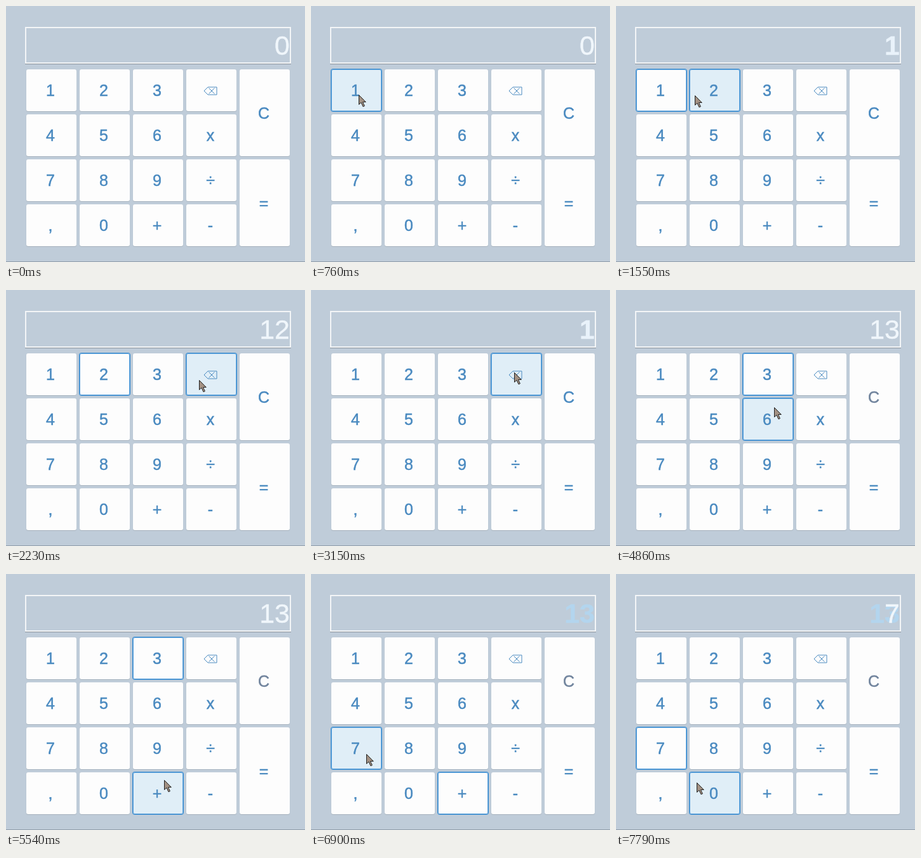
Animation, 471 px wide and 404 px high, one loop 8 s. Source, as an HTML page:

```html
<!DOCTYPE html>
<html lang="en">
<head>
<meta charset="utf-8">
<title>Calculator</title>
<style>
  html, body { margin: 0; width: 100%; height: 100%; overflow: hidden; }
  body { position: relative; background: #bfccd9; font-family: "Liberation Sans", Arial, sans-serif; }
  body::after { content: ""; position: absolute; left: 0; right: 0; top: 403px; height: 1px; background: #8f9ca9; }
  #display {
    position: absolute; left: 30px; top: 33px; width: 415px; height: 54px;
    border: 2px solid #f3f5f7; box-shadow: 0 1px 0 #8b949d;
  }
  #display span {
    position: absolute; right: 0; top: 0; font-size: 43px; line-height: 54px;
    color: #f0f6fb; -webkit-text-stroke: .4px;
  }
  #display .bold { font-weight: bold; color: #e9f2fa; }
  #display #operand { font-weight: bold; color: #b3d5ee; }
  .key {
    position: absolute; width: 79px; box-sizing: border-box; padding: 1px 3px 0 0;
    display: flex; align-items: center; justify-content: center;
    background: #fdfdfd; color: #4a8ac0; font-size: 25px; -webkit-text-stroke: .5px;
    border-radius: 3px; box-shadow: 0 1px 1px #a9b4bf;
  }
  .key.focus, .key.hover { box-shadow: 0 0 0 1px #3288cf, inset 0 0 0 1px #6aa8dc; }
  .key.hover { background: #e0eef7; }
  #cursor { position: absolute; left: 0; top: 0; overflow: visible; }
</style>
</head>
<body>
<div id="display"><span id="operand"></span><span id="value"></span></div>
<svg id="cursor" width="13" height="20">
  <path d="M.5 .5V15.5l3.5-3.2 3 6.5 2.4-1.1-2.9-6.2h4.8z" fill="#a39183" stroke="#222"/>
</svg>
<script>
const LOOP = 8000, START = 302, STEP = 113.4, CLICK = 1.5;
const $ = id => document.getElementById(id);
const cursor = $("cursor"), value = $("value"), operand = $("operand");

const eraseIcon = `<svg width="22" height="14" fill="none" stroke="currentColor">
  <path d="M1 7l6-6H21v12H7zM8.5 2.5l9 9m0-9l-9 9"/></svg>`;

// label, column, row, row span
const layout = [
  ["C", 4, 0, 2], ["=", 4, 2, 2],
  ...[..."123⌫456x789÷,0+-"].map((label, i) => [label, i % 4, i >> 2, 1])
];
const keys = layout.map(([label, column, row, span]) => {
  const box = { x: Math.round(32 + column * 83.9), y: 100 + row * 71, w: 79, h: span * 71 - 5 };
  const el = document.createElement("div");
  el.className = "key";
  el.style.cssText = `left:${box.x}px;top:${box.y}px;height:${box.h}px`;
  if (label === "⌫") el.innerHTML = eraseIcon;
  else el.textContent = label;
  document.body.insertBefore(el, cursor);
  return { label, el, ...box };
});
const clearKey = keys[0];

// Pointer stops: arrival step, departure step, x, y
const stops = [
  [0, 0, 80, 352], [4, 8, 75, 140], [11, 11, 124, 141], [15, 15, 142, 142],
  [18, 18, 361, 142], [21, 26, 320, 130], [28, 28, 430, 200], [30, 30, 460, 283],
  [33, 37, 249, 136], [46, 51, 249, 325], [58, 62, 87, 284], [66, 99, 127, 329]
];
const presses = [[5.5, "1"], [13.5, "2"], [21, "⌫"], [35, "3"], [49, "+"], [59.5, "7"]];

function pointerAt(step) {
  const i = stops.findLastIndex(stop => stop[0] <= step);
  const [, leave, x, y] = stops[i];
  if (step <= leave) return [x, y];
  const [arrive, , nextX, nextY] = stops[i + 1];
  const f = (step - leave) / (arrive - leave), eased = f * f * (3 - 2 * f);
  return [x + (nextX - x) * eased, y + (nextY - y) * eased];
}

// A key takes focus when pressed and acts when released
function calculate(step) {
  const state = { focus: "", text: "0", stored: "" };
  for (const [pressed, label] of presses) {
    if (step >= pressed) state.focus = label;
    if (step < pressed + CLICK) continue;
    if (label === "⌫") state.text = state.text.slice(0, -1);
    else if (label === "+") [state.stored, state.text] = [state.text, ""];
    else state.text = state.text === "0" ? label : state.text + label;
  }
  return state;
}

function render(time) {
  const step = Math.floor((time - START) / STEP);
  const [x, y] = step < 0 ? [-99, -99] : pointerAt(step);
  cursor.style.transform = `translate(${Math.round(x)}px,${Math.round(y)}px)`;

  const { focus, text, stored } = calculate(step);
  for (const k of keys) {
    const inside = x >= k.x && x <= k.x + k.w && y >= k.y && y <= k.y + k.h;
    k.el.classList.toggle("hover", inside);
    k.el.classList.toggle("focus", k.label === focus);
  }
  clearKey.el.style.color = step >= 29 ? "#71849d" : "";

  value.textContent = text;
  value.classList.toggle("bold", text === "1");
  operand.textContent = stored;
}

function tick() {
  render(performance.now() % LOOP);
  requestAnimationFrame(tick);
}
tick();
</script>
</body>
</html>
```
